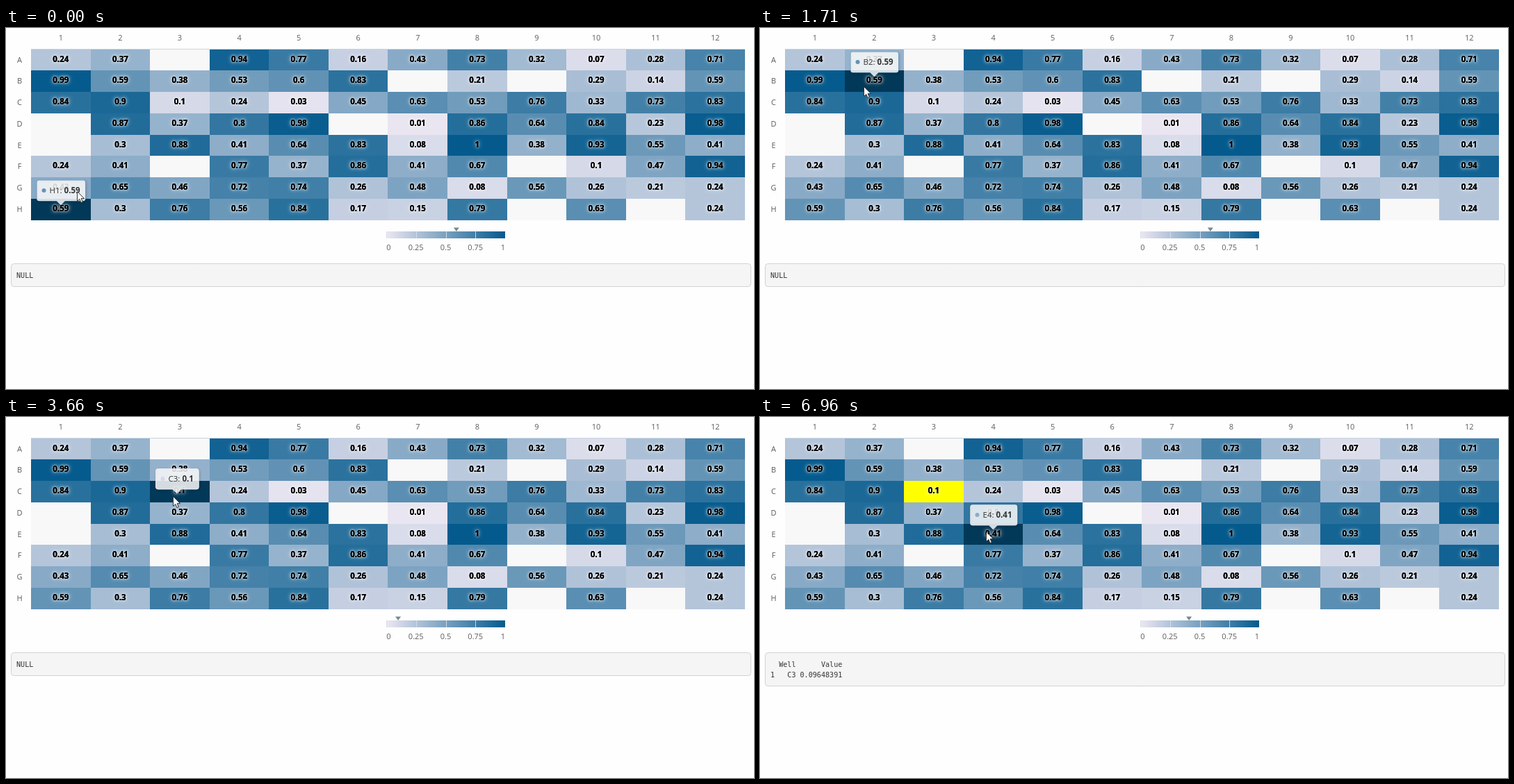
These frames come from a looping animation (1076x520 px, 8 s). An HTML page with a canvas:

```html
<!DOCTYPE html>
<html lang="en">
<head>
<meta charset="utf-8">
<title>Plate heatmap</title>
<style>
html, body { margin: 0; width: 100%; height: 100%; overflow: hidden; background: #fefefe; }
canvas { display: block; }
</style>
</head>
<body>
<canvas id="stage" width="1076" height="520"></canvas>
<script>
const ctx = document.getElementById('stage').getContext('2d');
const SANS = '"Open Sans", "Noto Sans", sans-serif';
const MONO = '"DejaVu Sans Mono", monospace';
const LOOP = 8000;
const LEFT = 36, TOP = 30.7, CELL_W = 85.58, CELL_H = 30.75;
const BAR = { x: 547, y: 293, w: 171, h: 10 };
const LOW = [236, 231, 242], HIGH = [4, 90, 141];
const SELECT_AT = 4860, PRINT_AT = 4940;
const ROWS = 'ABCDEFGH';

const plate = `
24 37 - 94 77 16 43 73 32 7 28 71
99 59 38 53 60 83 - 21 - 29 14 59
84 90 10 24 3 45 63 53 76 33 73 83
- 87 37 80 98 - 1 86 64 84 23 98
- 30 88 41 64 83 8 100 38 93 55 41
24 41 - 77 37 86 41 67 - 10 47 94
43 65 46 72 74 26 48 8 56 26 21 24
59 30 76 56 84 17 15 79 - 63 - 24`.trim().split('\n')
  .map(row => row.split(' ').map(v => v === '-' ? null : v / 100));

// Screen updates come in bursts: [first, last, count]
const bursts = [
  [110, 830, 9], [930, 1280, 5], [1710, 2110, 5], [2260, 2350, 2], [2520, 2980, 6],
  [3290, 3810, 7], [4860, 4940, 2], [6080, 6790, 9], [6890, 6960, 2]
];

const hovers = [
  [0, 'H1'], [110, 'G1'], [195, 'F1'], [285, 'E1'], [370, 'D1'], [620, 'C1'], [745, 'B2'],
  [1850, 'C2'], [2650, 'D2'], [3400, 'D3'], [3540, 'C3'], [6135, 'D3'], [6400, 'D4'], [6660, 'E4']
];

// Pointer path: [time, x, y]
const path = [
  [0, 102, 235], [60, 102, 235], [200, 106, 208], [380, 113, 152], [560, 117, 128],
  [650, 120, 112], [740, 128, 91], [830, 137, 86], [1100, 147, 83], [1280, 149, 84],
  [1710, 149, 84], [2010, 153, 100], [2110, 155, 102], [2260, 156, 102], [2350, 161, 103],
  [2520, 162, 106], [2700, 165, 128], [2888, 166, 139], [2980, 166, 141], [3290, 172, 139],
  [3460, 215, 126], [3640, 240, 114], [3810, 243, 109], [6050, 243, 109], [6169, 258, 128],
  [6346, 304, 145], [6524, 316, 149], [6701, 324, 162], [6790, 325, 167], [6960, 325, 165],
  [8000, 325, 165]
];
const overText = [[2350, 2520], [2850, 3290]];

const cellX = col => LEFT + col * CELL_W;
const cellY = row => TOP + row * CELL_H;
const shade = v => v === null ? '#f8f8f8'
  : `rgb(${LOW.map((c, i) => Math.round(c + (HIGH[i] - c) * v)).join()})`;

function well(name) {
  const row = ROWS.indexOf(name[0]), col = name.slice(1) - 1;
  return { name, row, col, value: plate[row][col], x: cellX(col) + CELL_W / 2, y: cellY(row) - 27.3 };
}

function text(c, str, x, y, font, color, align = 'center') {
  c.font = font;
  c.fillStyle = color;
  c.textAlign = align;
  c.fillText(str, x, y);
}

function fillCell(c, row, col, color) {
  const x = Math.round(cellX(col)), y = Math.round(cellY(row));
  c.fillStyle = color;
  c.fillRect(x, y, Math.round(cellX(col + 1)) - x, Math.round(cellY(row + 1)) - y);
}

function layer(paint) {
  const canvas = document.createElement('canvas');
  canvas.width = 1076;
  canvas.height = 520;
  paint(canvas.getContext('2d'));
  return canvas;
}

const backdrop = layer(c => {
  const label = (s, x, y) => text(c, s, x, y, `11px ${SANS}`, '#5c5c5c');
  c.fillStyle = '#fefefe';
  c.fillRect(0, 0, 1076, 520);
  c.fillStyle = '#c6d4e2';
  c.fillRect(LEFT, 30, 1027, 1);
  c.fillRect(LEFT, 276, 1027, 1);
  for (let col = 0; col < 12; col++) label(col + 1, cellX(col) + CELL_W / 2, 18);
  plate.forEach((values, row) => {
    label(ROWS[row], 19.5, cellY(row) + 19);
    values.forEach((v, col) => fillCell(c, row, col, shade(v)));
  });

  const ramp = c.createLinearGradient(BAR.x, 0, BAR.x + BAR.w, 0);
  ramp.addColorStop(0, shade(0));
  ramp.addColorStop(1, shade(1));
  c.fillStyle = ramp;
  c.fillRect(BAR.x, BAR.y, BAR.w, BAR.h);
  [0, 0.25, 0.5, 0.75, 1].forEach(v => {
    const x = BAR.x + v * BAR.w;
    c.fillStyle = 'rgba(215,222,232,0.9)';
    if (v < 1) c.fillRect(Math.round(x), BAR.y, 1, BAR.h);
    label(v, v === 0 ? x + 3.5 : v === 1 ? x - 3 : x, 319.5);
  });
});

const labels = layer(c => {
  plate.forEach((values, row) => values.forEach((v, col) => {
    if (v === null) return;
    c.shadowColor = '#fff';
    for (const blur of [6, 3, 0]) {
      c.shadowBlur = blur;
      text(c, v, cellX(col) + CELL_W / 2, cellY(row) + 18, `bold 11.5px ${SANS}`, '#000');
    }
  }));
});

function snap(t) {
  let shown = 0;
  for (const [first, last, count] of bursts) {
    if (t < first) break;
    const step = (last - first) / (count - 1);
    shown = first + step * Math.min(count - 1, Math.floor((t - first) / step + 1e-6));
  }
  return shown;
}

// The tooltip eases exponentially towards each hovered well.
function tooltipAt(t) {
  let { x, y } = well('H1'), target;
  hovers.forEach(([start, name], i) => {
    if (start > t) return;
    target = well(name);
    const end = Math.min(t, i + 1 < hovers.length ? hovers[i + 1][0] : LOOP);
    const rest = Math.exp((start - end) / 79);
    x = target.x + (x - target.x) * rest;
    y = target.y + (y - target.y) * rest;
  });
  return { target, x, y };
}

function pointerAt(t) {
  const i = Math.max(1, path.findIndex(p => p[0] >= t));
  const [t0, x0, y0] = path[i - 1], [t1, x1, y1] = path[i];
  const k = (t - t0) / (t1 - t0);
  return [x0 + (x1 - x0) * k, y0 + (y1 - y0) * k];
}

function drawTooltip({ target, x, y }) {
  const regular = `11.5px ${SANS}`, bold = `bold 11.5px ${SANS}`;
  const name = target.name + ': ', value = String(target.value);
  ctx.font = regular;
  const nameW = ctx.measureText(name).width;
  ctx.font = bold;
  const w = 18 + nameW + ctx.measureText(value).width + 7.5, h = 29.5;
  const left = Math.round(x - w / 2) + 0.5, top = Math.round(y) + 0.5;
  const right = left + w, bottom = top + h, r = 3;

  ctx.beginPath();
  ctx.moveTo(left + r, top);
  ctx.arcTo(right, top, right, bottom, r);
  ctx.arcTo(right, bottom, left, bottom, r);
  ctx.lineTo(x + 6, bottom);
  ctx.lineTo(x, bottom + 6);
  ctx.lineTo(x - 6, bottom);
  ctx.arcTo(left, bottom, left, top, r);
  ctx.arcTo(left, top, right, top, r);
  ctx.closePath();
  ctx.lineWidth = 1;
  ctx.save();
  ctx.shadowColor = 'rgba(0,0,0,0.4)';
  ctx.shadowBlur = 3;
  ctx.shadowOffsetX = ctx.shadowOffsetY = 1;
  ctx.strokeStyle = shade(target.value);
  ctx.stroke();
  ctx.restore();
  ctx.fillStyle = 'rgba(249,249,249,0.85)';
  ctx.fill();

  ctx.beginPath();
  ctx.arc(left + 10, top + 14.5, 3, 0, Math.PI * 2);
  ctx.fillStyle = shade(target.value);
  ctx.fill();
  text(ctx, name, left + 18, top + 18, regular, '#333', 'left');
  text(ctx, value, left + 18 + nameW, top + 18, bold, '#333', 'left');
}

function drawMarker(v) {
  const x = BAR.x + BAR.w * (v || 0);
  ctx.beginPath();
  ctx.moveTo(x - 4, 287.5);
  ctx.lineTo(x + 4, 287.5);
  ctx.lineTo(x, 293);
  ctx.fillStyle = v === null ? '#6d8fb5' : '#78888f';
  ctx.fill();
}

function drawOutput(printed) {
  const lines = printed ? ['  Well      Value', '1   C3 0.09648391'] : ['NULL'];
  ctx.beginPath();
  ctx.roundRect(7.5, 339.5, 1064, printed ? 48 : 33, 4);
  ctx.fillStyle = '#f5f5f5';
  ctx.fill();
  ctx.strokeStyle = '#d2d2d2';
  ctx.lineWidth = 1;
  ctx.stroke();
  lines.forEach((s, i) => text(ctx, s, 15, 359.5 + i * 15.3, `10.1px ${MONO}`, '#333', 'left'));
}

function drawPointer(t) {
  const [x, y] = pointerAt(t).map(Math.round);
  ctx.save();
  ctx.translate(x, y);
  if (overText.some(([from, to]) => t >= from && t < to)) {
    const beam = new Path2D('M-3.5 -7.5H-1L0 -6.5L1 -7.5H3.5M0 -6.5V6.5M-3.5 7.5H-1L0 6.5L1 7.5H3.5');
    ctx.strokeStyle = 'rgba(20,40,55,0.7)';
    ctx.lineWidth = 3;
    ctx.stroke(beam);
    ctx.strokeStyle = '#fff';
    ctx.lineWidth = 1.4;
    ctx.stroke(beam);
  } else {
    const arrow = new Path2D('M0.5 0.5V14.5L3.8 11.4L6 16.5L8.3 15.5L6.1 10.6H10.5Z');
    ctx.fillStyle = '#fff';
    ctx.fill(arrow);
    ctx.strokeStyle = '#333';
    ctx.lineWidth = 1;
    ctx.stroke(arrow);
  }
  ctx.restore();
}

function frame(now) {
  const t = snap(now % LOOP);
  const tip = tooltipAt(t), { row, col, value } = tip.target;
  ctx.drawImage(backdrop, 0, 0);
  fillCell(ctx, row, col, '#023858');
  if (t >= SELECT_AT) fillCell(ctx, 2, 2, '#ffff00');
  ctx.drawImage(labels, 0, 0);
  drawMarker(value);
  drawOutput(t >= PRINT_AT);
  drawTooltip(tip);
  drawPointer(t);
  requestAnimationFrame(frame);
}
requestAnimationFrame(frame);
</script>
</body>
</html>
```
